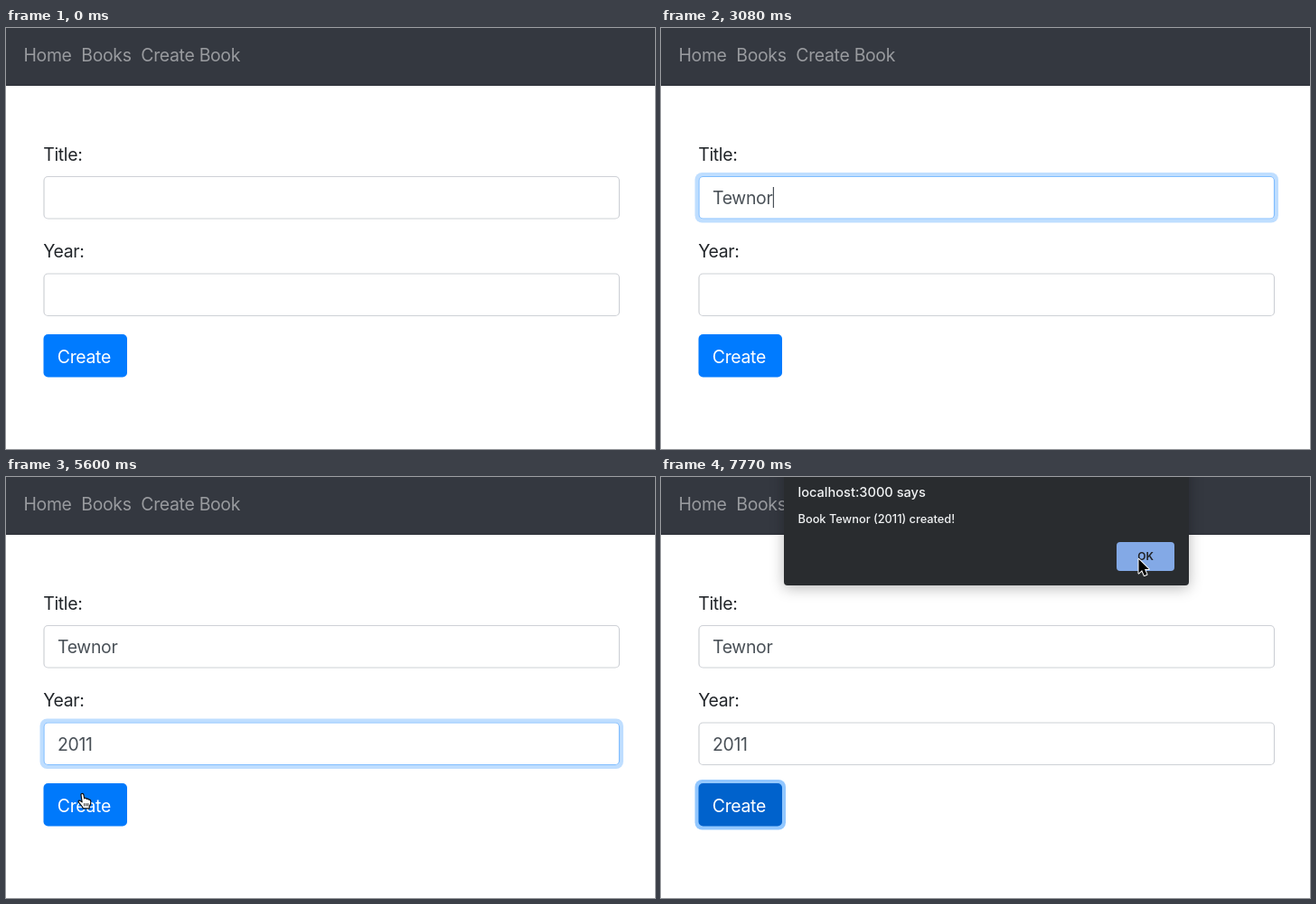
An HTML page with a canvas that plays this animation: 718 px wide and 466 px high, repeating every 8 s.

```html
<!DOCTYPE html>
<html lang="en">
<head>
<meta charset="utf-8">
<title>Create Book</title>
<style>
html, body { margin: 0; width: 100%; height: 100%; overflow: hidden; background: #fff; }
canvas { display: block; }
</style>
</head>
<body>
<canvas id="stage" width="718" height="466"></canvas>
<script>
const ctx = document.getElementById('stage').getContext('2d');
const LOOP = 8000, STEP = 70, FADE = 150;
const FONT = 'Inter, Roboto, "Liberation Sans", sans-serif';

// Moments of the interaction, in ms
const FOCUS_TITLE = 1180, FOCUS_YEAR = 3480, HOVER = 5570, PRESS = 6130, ALERT = 6330;
const TITLE = { text: 'Tewnor', keys: [1820, 2100, 2380, 2590, 2800, 3080] };
const YEAR = { text: '2011', keys: [3990, 4410, 4620, 4900] };

// Pointer waypoints: time, x, y
const ENTER = [[210, 315, 417], [910, 205, 176], [1190, 204, 189]];
const TO_BUTTON = [[5040, 204, 189], [5570, 84, 350], [5810, 96, 364]];
const TO_OK = [[7000, 96, 364], [7770, 528.5, 91]];

const clamp = v => Math.max(0, Math.min(1, v));
const smooth = v => { v = clamp(v); return v * v * (3 - 2 * v); };
const fade = (t, start) => smooth((t - start) / FADE);
const mix = (a, b, k) => `rgb(${a.map((v, i) => Math.round(v + (b[i] - v) * k))})`;

function box(x, y, w, h, r, fill) {
  ctx.beginPath();
  ctx.roundRect(x, y, w, h, r);
  if (fill) { ctx.fillStyle = fill; ctx.fill(); }
}

function label(str, x, y, color, size = 19.4, weight = 400, spacing = -0.3) {
  ctx.font = `${weight} ${size}px ${FONT}`;
  ctx.letterSpacing = spacing + 'px';
  ctx.fillStyle = color;
  ctx.fillText(str, x, y);
  return ctx.measureText(str).width;
}

const typed = (entry, t) => entry.text.slice(0, entry.keys.filter(k => k <= t).length);

function caretOn(entry, t, focus) {
  const last = Math.max(focus, ...entry.keys.filter(k => k <= t));
  return (t - last) % 1000 < 500;
}

function field(entry, y, t, start, end) {
  const glow = fade(t, start) * (1 - fade(t, end));
  if (glow > 0) {
    box(37.5, y - 4, 645.5, 55.5, 8, `rgba(0,123,255,${0.25 * glow})`);
  }
  box(41.5, y, 637.5, 47.5, 5, '#fff');
  box(42, y + 0.5, 636.5, 46.5, 4.5);
  ctx.strokeStyle = mix([206, 209, 214], [128, 189, 255], glow);
  ctx.lineWidth = 1.2;
  ctx.stroke();
  const w = label(typed(entry, t), 57, y + 31.2, '#495057');
  if (t >= start && t < end && caretOn(entry, t, start)) {
    ctx.fillStyle = '#495057';
    ctx.fillRect(57.4 + w, y + 12, 1.2, 23);
  }
}

function button(t) {
  const ring = fade(t, PRESS);
  if (ring > 0) box(37.5, 335, 100.5, 55.5, 8, `rgba(38,143,255,${0.5 * ring})`);
  const color = t < PRESS
    ? mix([0, 123, 255], [0, 105, 217], fade(t, HOVER))
    : mix([0, 105, 217], [0, 98, 204], ring);
  box(41.5, 339, 92.5, 47.5, 5, color);
  label('Create', 56.8, 370.5, '#fff');
}

function suggestions(t) {
  if (t < YEAR.keys[0] || t >= YEAR.keys[3]) return;
  const years = t < YEAR.keys[2] ? [2022, 2015, 2025, 2008] : [2015, 2010, 2018, 2012];
  ctx.save();
  ctx.shadowColor = 'rgba(0,0,0,.3)';
  ctx.shadowBlur = 3;
  box(140, 328, 72, 160, 3, '#292c2f');
  ctx.restore();
  ctx.beginPath();
  ctx.moveTo(152, 328.5);
  ctx.lineTo(161, 320);
  ctx.lineTo(170, 328.5);
  ctx.fill();
  years.forEach((v, i) => label(String(v), 151.5, 355 + 36 * i, '#f4f5f6', 12.8, 500, 0));
}

function dialog(t, p) {
  if (t < ALERT) return;
  ctx.save();
  ctx.globalAlpha = fade(t, ALERT);
  ctx.save();
  ctx.shadowColor = 'rgba(0,0,0,.28)';
  ctx.shadowBlur = 16;
  ctx.shadowOffsetY = 3;
  box(136, -20, 448, 140, 4, '#292c2f');
  ctx.restore();
  label('localhost:3000 says', 151.5, 22, '#f1f3f4', 14.6, 500, 0);
  label(`Book ${TITLE.text} (${YEAR.text}) created!`, 151.5, 51, '#f1f3f4', 12.8, 500, 0);
  const over = p && p.x > 504 && p.x < 568 && p.y > 72 && p.y < 104;
  box(504, 72, 64, 32, 4, over ? '#83a9e6' : '#8ab4f8');
  ctx.textAlign = 'center';
  label('OK', 536, 92.2, '#202124', 12, 600, 0);
  ctx.restore();
}

function along(path, t) {
  const i = path.findIndex(([time]) => time > t);
  if (i < 0) { const [, x, y] = path[path.length - 1]; return { x, y }; }
  const a = path[Math.max(0, i - 1)], b = path[i];
  const k = smooth((t - a[0]) / (b[0] - a[0]));
  return { x: a[1] + (b[1] - a[1]) * k, y: a[2] + (b[2] - a[2]) * k };
}

function pointer(t) {
  if (t < 210 || (t >= 1820 && t < 5110)) return null;
  return along(t < 1820 ? ENTER : t < 7000 ? TO_BUTTON : TO_OK, t);
}

const ARROW = new Path2D('M0 0V15.4L3.6 12.1L6.2 18L9 16.8L6.5 11.1H11.2Z');
const BEAM = new Path2D('M-3.2 -7.5Q-.4 -7.5 0 -5.6Q.4 -7.5 3.2 -7.5M0 -5.6V5.6M-3.2 7.5Q-.4 7.5 0 5.6Q.4 7.5 3.2 7.5M-1.8 1.5H1.8');
const HAND = new Path2D('M-1.6 .6Q0 -1 1.3 .7L2.2 5.2Q3.8 4.2 4.8 5.8Q6.3 5 7.2 6.6Q9.2 6.2 9.3 8.6Q9.4 12 7.7 14V16.3H.8Q.3 14.4 -2 12L-4.4 9Q-4.6 7 -2.7 7.6L-.4 9.2Z');
const KNUCKLES = new Path2D('M2.2 10.5V13.8M4.3 10.5V13.8M6.3 10.5V13.8');

function outline(path, color, width) {
  ctx.strokeStyle = color;
  ctx.lineWidth = width;
  ctx.stroke(path);
}

function cursor(t, p) {
  if (!p) return;
  const inX = (a, b) => p.x >= a && p.x <= b;
  const inY = (a, b) => p.y >= a && p.y <= b;
  ctx.save();
  ctx.translate(p.x, p.y);
  ctx.lineJoin = 'round';
  if (t < ALERT && inX(42, 134) && inY(339, 386)) {
    ctx.fillStyle = '#fff';
    ctx.fill(HAND);
    outline(HAND, '#111', 1.2);
    outline(KNUCKLES, '#111', 0.9);
  } else if (t < ALERT && inX(42, 679) && (inY(164, 211) || inY(272, 319))) {
    outline(BEAM, '#fff', 3);
    outline(BEAM, '#111', 1.3);
  } else {
    outline(ARROW, '#fff', 2);
    ctx.fillStyle = '#000';
    ctx.fill(ARROW);
  }
  ctx.restore();
}

function draw(t) {
  const p = pointer(t);
  ctx.fillStyle = '#fff';
  ctx.fillRect(0, 0, 718, 466);
  ctx.fillStyle = '#343840';
  ctx.fillRect(0, 0, 718, 64);
  ctx.fillStyle = '#2b2f37';
  ctx.fillRect(0, 63, 718, 1);
  [['Home', 19.5], ['Books', 83.3], ['Create Book', 149.3]]
    .forEach(([s, x]) => label(s, x, 36.7, '#999b9f'));
  label('Title:', 41.2, 146.7, '#212529');
  label('Year:', 41.2, 254.2, '#212529');
  field(TITLE, 164, t, FOCUS_TITLE, FOCUS_YEAR);
  field(YEAR, 271.5, t, FOCUS_YEAR, PRESS);
  button(t);
  suggestions(t);
  dialog(t, p);
  cursor(t, p);
}

const begin = performance.now();
function tick() {
  const t = (performance.now() - begin) % LOOP;
  draw(Math.floor(t / STEP) * STEP);
  requestAnimationFrame(tick);
}
tick();
</script>
</body>
</html>
```
